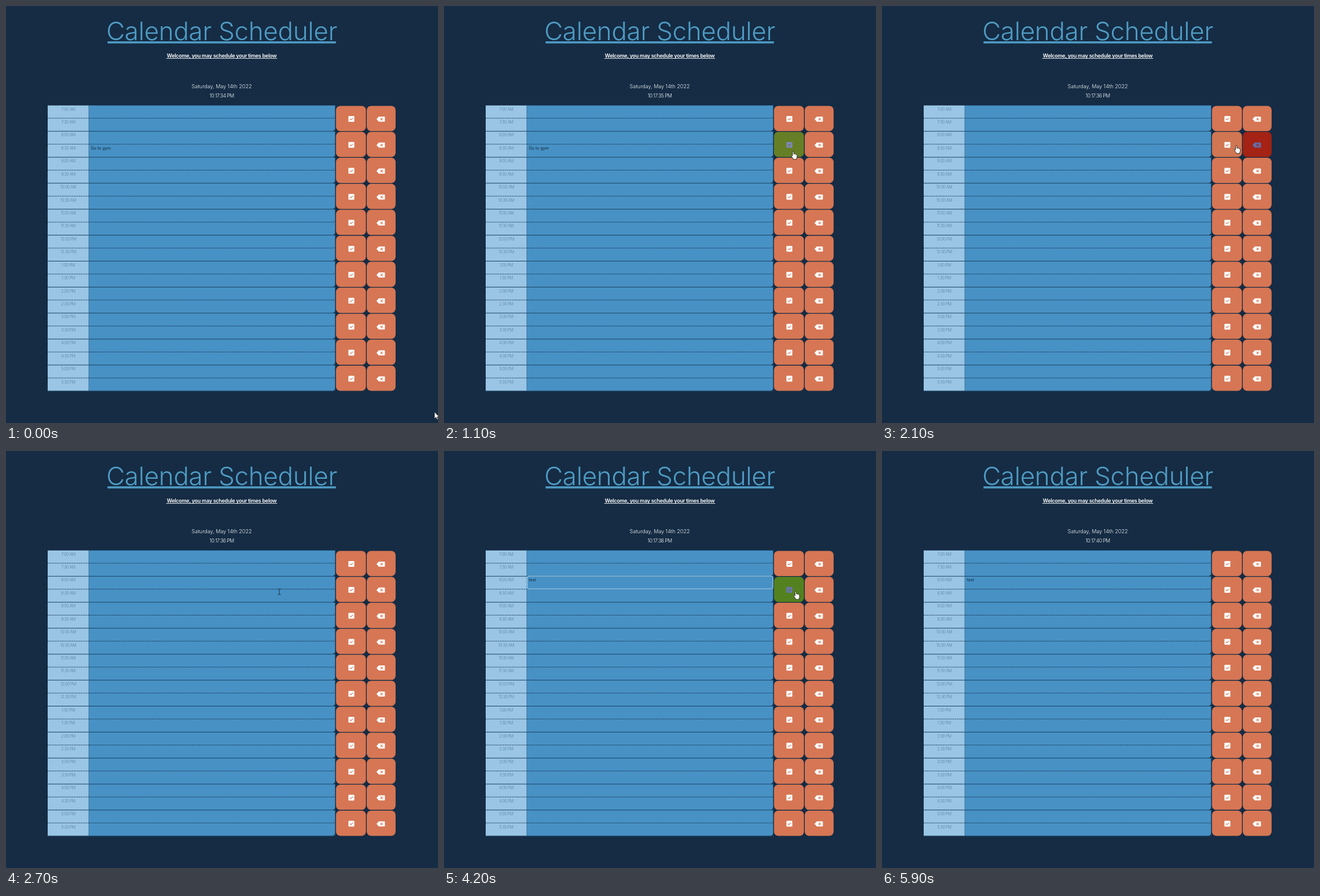
Recreate the animation shown at these times as an HTML page. Size 746x720 px, loop 6 s.

```html
<!DOCTYPE html>
<html lang="en">
<head>
<meta charset="utf-8">
<title>Calendar Scheduler</title>
<style>
  html, body { margin: 0; width: 100%; height: 100%; overflow: hidden; background: #152c44; }
  svg { display: block; width: 746px; height: 720px; font-family: Inter, "Open Sans", sans-serif; cursor: default; }
  .mid { text-anchor: middle; }
  .title { font-size: 44px; font-weight: 300; fill: #4f9bc3; letter-spacing: -.32px; }
  .intro { font-size: 9px; font-weight: 600; fill: #fff; letter-spacing: -.27px; }
  .date { font-size: 9px; font-weight: 300; fill: #f2f5f8; }
  .clock { font-size: 8.7px; font-weight: 300; fill: #f2f5f8; letter-spacing: -.55px; }
  .label { font-size: 6.9px; font-weight: 300; fill: #58809f; letter-spacing: -.4px; }
  .entry { font-size: 7.1px; fill: #13293d; }
</style>
</head>
<body>
<svg id="stage" viewBox="0 0 746 720"></svg>
<script>
const NS = 'http://www.w3.org/2000/svg';
const stage = document.getElementById('stage');
const LOOP = 6000, STEP = 100, FADE = 500;
const TOP = 171.7, PITCH = 44.85, HALF = PITCH / 2, ROWS = 11;
const ORANGE = [214, 118, 84], GREEN = [66, 130, 24], RED = [160, 28, 14];
const WHITE = [255, 255, 255], NAVY = [40, 58, 140];

function add(tag, attrs, parent = stage, text) {
  const el = document.createElementNS(NS, tag);
  for (const key in attrs) el.setAttribute(key, attrs[key]);
  if (text) el.textContent = text;
  parent.append(el);
  return el;
}
const rect = (x, y, width, height, fill, more) => add('rect', { x, y, width, height, fill, ...more });
const line = (x1, y1, x2, y2, stroke, more) => add('line', { x1, y1, x2, y2, stroke, ...more });
const words = (x, y, cls, text) => add('text', { x, y, class: cls }, stage, text);
const show = (el, on) => el.setAttribute('visibility', on ? 'visible' : 'hidden');

const lerp = (a, b, k) => a + (b - a) * k;
const mix = (a, b, k) => `rgb(${a.map((v, i) => Math.round(lerp(v, b[i], k)))})`;
const smooth = p => p * p * (3 - 2 * p);
const easeOut = p => 1 - (1 - p) ** 2;

// Heading
words(372.5, 59, 'title mid', 'Calendar Scheduler');
rect(175.3, 61, 394.4, 3.6, '#4f9bc3');
words(372.5, 89.2, 'intro mid', 'Welcome, you may schedule your times below');
rect(276.8, 90, 191.4, .9, '#fff');
words(372.5, 142.4, 'date mid', 'Saturday, May 14th 2022');
const clock = words(372.5, 158.2, 'clock mid', '');

// Table
const height = PITCH * ROWS;
rect(72, TOP, 71, height, '#9ac5e5');
rect(143, TOP, 425.6, height, '#4791c5');
line(143, TOP, 143, TOP + height, '#3a6d94', { 'stroke-width': .8 });
line(568.6, TOP, 568.6, TOP + height, '#234a69');

const buttons = [];
function addButton(x, y, width, hot, icon, mark) {
  const box = rect(x, y + .7, width, PITCH - 1.3, '', { rx: 7.5 });
  const shape = add('path', { d: icon });
  const glyph = add('path', { d: mark, fill: 'none', 'stroke-width': 1.1 });
  buttons.push({
    contains: p => p.x >= x && p.x < x + width && p.y >= y && p.y < y + PITCH,
    paint(k) {
      const base = mix(ORANGE, hot, k);
      box.setAttribute('fill', base);
      glyph.setAttribute('stroke', base);
      shape.setAttribute('fill', mix(WHITE, NAVY, k * .8));
    }
  });
}

for (let r = 0; r < ROWS; r++) {
  const y = TOP + r * PITCH, mid = y + HALF, end = y + PITCH, cy = y + 23.2;
  const hour = (r + 6) % 12 + 1, half = r < 5 ? 'AM' : 'PM';
  words(107.5, y + 8.9, 'label mid', `${hour}:00 ${half}`);
  words(107.5, mid + 8.9, 'label mid', `${hour}:30 ${half}`);
  line(72, mid - .4, 568, mid - .4, '#17364f', { 'stroke-dasharray': '2 1', 'stroke-width': .9 });
  line(72, end - .3, 569, end - .3, '#1d4363');
  add('path', { d: `M568.6 ${end - 4}l-4 4h4z`, fill: '#17364f' });
  add('path', { d: `M568 ${mid - 4}l-3 3`, stroke: '#347099', 'stroke-width': .6 });

  addButton(569.8, y, 51.8, GREEN,
    `M592.3 ${cy - 5}h8.2q1 0 1 1v8q0 1-1 1h-8.2q-1 0-1-1v-8q0-1 1-1z`,
    `M594 ${cy}l1.7 1.7 3.2-3.3`);
  addButton(623, y, 49.8, RED,
    `M639.8 ${cy + .4}l4-4.4h9.5q1 0 1 1v6.8q0 1-1 1h-9.5z`,
    `M646.6 ${cy - 1.6}l4 4m0-4l-4 4`);
}

const focus = rect(143.6, TOP + PITCH - .4, 424.4, 22, 'none', { rx: 3, stroke: '#9ccbea', 'stroke-width': 1.2 });
const early = words(146.4, TOP + PITCH + 8.9, 'entry', '');
const late = words(146.4, TOP + PITCH + HALF + 8.9, 'entry', 'Go to gym');

// Pointers, each centred on the tracked point
const arrow = add('path', { d: 'M-1-5v11.4l2.6-2.4 1.6 3.7 1.8-.8-1.6-3.5h3.5z', fill: '#fff', stroke: '#111', 'stroke-width': .6 });
const hand = add('path', {
  d: 'M-2.8 1V-5.3q0-1.3 1.1-1.3t1.1 1.3V-2.1q1.6-.8 2 .4 1.5-.6 1.9.5 1.7-.4 1.7 1.2V3q0 1.5-1 2.6V7.2H-1.8V6q-1.5-1.8-3-4.6-.5-1.3.5-1.5.8 0 1.5 1.1z',
  fill: '#fff', stroke: '#111', 'stroke-width': .8
});
const beam = add('path', { d: 'M-2.5-5q2 0 2.5.9.5-.9 2.5-.9M0-4.1v8.2M-2.5 5q2 0 2.5-.9.5.9 2.5.9', fill: 'none', stroke: '#14283a', 'stroke-width': .9 });

// Pointer journey: each move eases to a place and rests until the next begins.
const home = { x: 741, y: 706 };
const moves = [
  { from: 0, to: 800, x: 593, y: 262, ease: easeOut },
  { from: 800, to: 1600, x: 630, y: 248, ease: smooth },
  { from: 2000, to: 2500, x: 472, y: 243, ease: smooth },
  { from: 2700, to: 3000, x: 235, y: 229, ease: smooth },
  { from: 3400, to: 3900, x: 609, y: 249, ease: easeOut },
  { from: 4300, to: 4900, x: 501, y: 318, ease: smooth }
];
const CLEAR = 2000, FOCUS = 3000, SAVE = 4300, LEAVE = 5300;

function pointer(t) {
  let p = home;
  for (const m of moves) {
    if (t <= m.from) break;
    const k = m.ease(Math.min(1, (t - m.from) / (m.to - m.from)));
    p = { x: lerp(p.x, m.x, k), y: lerp(p.y, m.y, k) };
  }
  return p;
}

// Hover levels follow from where the pointer has been, at a constant fade rate.
function hoverLevels(t) {
  const levels = buttons.map(() => 0), dt = 20;
  for (let s = 0; s < t; s += dt) {
    const p = pointer(s), tip = { x: p.x - 2, y: p.y - 6 };
    buttons.forEach((b, i) => {
      const change = (b.contains(tip) ? dt : -dt) / FADE;
      levels[i] = Math.min(1, Math.max(0, levels[i] + change));
    });
  }
  return levels;
}

function draw(t) {
  clock.textContent = `10:17:${34 + Math.floor((t + 200) / 1000)} PM`;
  early.textContent = 'test'.slice(0, Math.max(0, Math.floor((t - FOCUS) / 100)));
  show(late, t < CLEAR);
  show(focus, t >= FOCUS && t < SAVE);
  hoverLevels(t).forEach((k, i) => buttons[i].paint(k));

  const { x, y } = pointer(t);
  const inTable = y > TOP && y < TOP + height;
  const kind = inTable && x > 569 && x < 673 ? hand : inTable && x > 143 && x <= 569 ? beam : arrow;
  for (const el of [arrow, hand, beam]) {
    el.setAttribute('transform', `translate(${x} ${y})`);
    show(el, el === kind && t < LEAVE);
  }
}

const start = performance.now();
let last = -1;
function tick() {
  const t = Math.floor((performance.now() - start) % LOOP / STEP) * STEP;
  if (t !== last) draw(last = t);
  requestAnimationFrame(tick);
}
tick();
</script>
</body>
</html>
```
